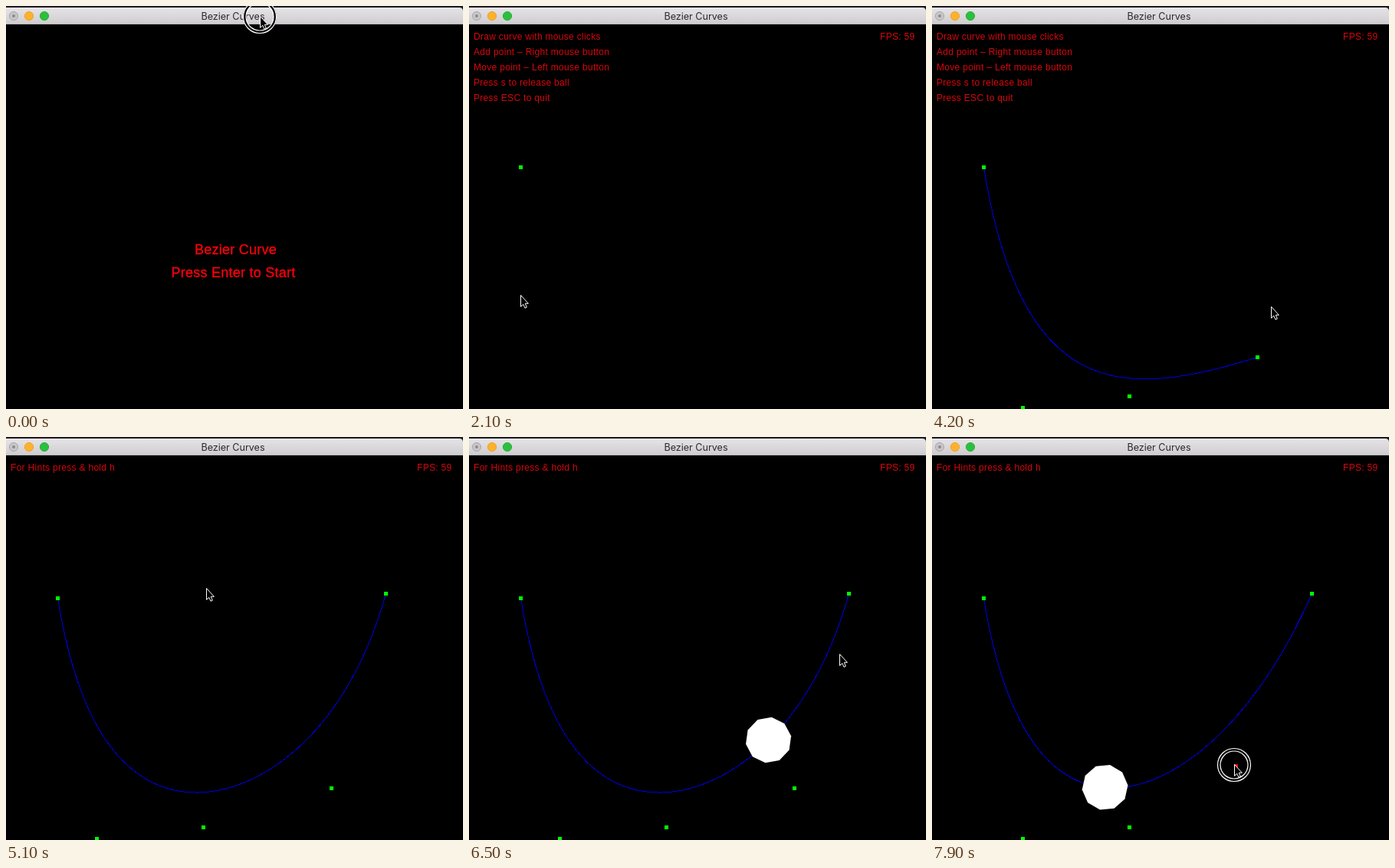
These frames come from a looping animation (596 by 526 pixels, 8 s). An HTML page:

```html
<!DOCTYPE html>
<html lang="en">
<head>
<meta charset="utf-8">
<title>Bezier Curves</title>
<style>
  html, body { margin: 0; width: 100%; height: 100%; overflow: hidden; background: #000; }
  svg { display: block; width: 596px; height: 526px; }
  text { white-space: pre; }
  .title { font: 12.55px Inter, "Open Sans", sans-serif; fill: #2b292b; text-anchor: middle; }
  .menu { font: 18px "Liberation Sans", Arial, sans-serif; letter-spacing: .25px; fill: #fa000a; stroke: #fa000a; stroke-width: .35px; }
  .hud { font: 12px "Liberation Sans", Arial, sans-serif; letter-spacing: .3px; fill: #d8060c; }
</style>
</head>
<body>
<svg viewBox="0 0 596 526">
  <defs>
    <linearGradient id="bar" x2="0" y2="1">
      <stop offset="0" stop-color="#e6e4e6"/>
      <stop offset="1" stop-color="#ceccce"/>
    </linearGradient>
  </defs>
  <rect width="596" height="526"/>
  <rect width="596" height="8" fill="#1d1c24"/>
  <path d="M0 24V2H591Q596 2 596 7V24Z" fill="url(#bar)"/>
  <rect y="23" width="596" height="1" fill="#b9b7b9"/>
  <circle cx="10" cy="13" r="5.6" fill="#c8c6c8" stroke="#a9a7a9"/>
  <circle cx="10" cy="13" r="2" fill="#8d8b8d"/>
  <circle cx="30" cy="13" r="5.6" fill="#fdb12c" stroke="#eba327"/>
  <circle cx="50" cy="13" r="5.6" fill="#2cbf3f" stroke="#25b037"/>
  <text class="title" x="296" y="18">Bezier Curves</text>

  <g id="menu" class="menu">
    <text x="246" y="324">Bezier Curve</text>
    <text x="215.5" y="354">Press Enter to Start</text>
  </g>
  <g id="hints" class="hud">
    <text x="6" y="44">Draw curve with mouse clicks</text>
    <text x="6" y="64">Add point – Right mouse button</text>
    <text x="6" y="84">Move point – Left mouse button</text>
    <text x="6" y="104">Press s to release ball</text>
    <text x="6" y="124">Press ESC to quit</text>
  </g>
  <text id="short" class="hud" x="6" y="44">For Hints press &amp; hold h</text>
  <text id="fps" class="hud" x="536" y="44">FPS: 59</text>

  <polyline id="curve" fill="none" stroke="#0000dc" shape-rendering="crispEdges" transform="translate(.5 .5)"/>
  <g id="points"></g>
  <polygon id="ball" fill="#fff"/>
  <g id="ring" fill="none">
    <circle r="20" stroke="#000" stroke-width="4"/>
    <circle r="21.5" stroke="#fff" stroke-width="1.2"/>
    <circle r="18" stroke="#fff" stroke-width="1.2"/>
  </g>
  <path id="cursor" d="M.5 .5V15.4L3.8 12.3 6 17.3 8.3 16.2 6.3 11.3H10.4Z" stroke="#fff"/>
</svg>
<script>
const LOOP = 8000, STEP = 100, PAUSE = 100;
const ENTER = 1300, HIDE_HINTS = 4400, RELEASE = 5400;
const RADIUS = 30, SIDES = 10, SEGMENTS = 60;

// where the mouse goes: arrival time, place, what it does there
const STOPS = [
  [0, 331, 13, "click"],
  [900, 192, 143, "click"],
  [1700, 67, 210, "add"],
  [2100, 67, 377],
  [2400, 118, 524, "add"],
  [3000, 257, 509, "add"],
  [3300, 353, 487],
  [3900, 424, 458, "add"],
  [4600, 495, 204, "add"],
  [5100, 261, 197],
  [5400, 261, 197],
  [6000, 515, 189],
  [7100, 423, 457],
  [7400, 423, 457, "drag"],
  [7900, 394, 427]
].map(([t, x, y, act]) => ({ t, x, y, act }));

const ADDED = STOPS.filter(s => s.act === "add");
const GRAB = STOPS.find(s => s.act === "drag").t;
const DRAGGED = 3;

const $ = id => document.getElementById(id);
const show = (el, on) => el.setAttribute("visibility", on ? "visible" : "hidden");
const mix = (a, b, u) => a + (b - a) * u;
const ease = u => u * u * (3 - 2 * u);

function mouseAt(t) {
  const i = STOPS.findLastIndex(s => t >= s.t);
  const a = STOPS[i], b = STOPS[i + 1] || a;
  const from = a.t + PAUSE;
  const u = t > from && b !== a ? ease((t - from) / (b.t - from)) : 0;
  return [mix(a.x, b.x, u), mix(a.y, b.y, u)];
}

function pressed(t) {
  return t >= GRAB || STOPS.some(s => s.act && t >= s.t && t < s.t + PAUSE);
}

function controlPoints(t, [mx, my]) {
  const pts = ADDED.filter(s => t >= s.t).map(s => [s.x, s.y]);
  if (t >= GRAB) pts[DRAGGED] = [mx + 2, my + 2];
  return pts;
}

function bezier(pts, u) {
  let p = pts;
  while (p.length > 1) {
    p = p.slice(1).map((q, i) => [mix(p[i][0], q[0], u), mix(p[i][1], q[1], u)]);
  }
  return p[0];
}

// points along the curve from its start to u
function trace(pts, u) {
  return Array.from({ length: SEGMENTS + 1 }, (_, i) => bezier(pts, u * i / SEGMENTS));
}

function lengthOf(line) {
  return line.slice(1).reduce((sum, [x, y], i) => sum + Math.hypot(x - line[i][0], y - line[i][1]), 0);
}

// damped swing along the curve parameter
function swing(sec) {
  return 0.494 - 0.491 * Math.exp(-0.0713 * sec) * Math.cos(1.9483 * sec);
}

function drawBall(pts, t) {
  show($("ball"), t >= RELEASE);
  if (t < RELEASE) return;
  const path = trace(pts, swing((t - RELEASE) / 1000));
  const [cx, cy] = path[SEGMENTS];
  const turn = lengthOf(path) / RADIUS + 0.07;
  const corners = Array.from({ length: SIDES }, (_, i) => {
    const a = turn + i * 2 * Math.PI / SIDES;
    return [cx + RADIUS * Math.cos(a), cy + RADIUS * Math.sin(a)];
  });
  $("ball").setAttribute("points", corners.join(" "));
}

const dots = ADDED.map(() => {
  const r = document.createElementNS("http://www.w3.org/2000/svg", "rect");
  r.setAttribute("width", 5);
  r.setAttribute("height", 5);
  return $("points").appendChild(r);
});

function drawDots(pts, t) {
  dots.forEach((dot, i) => {
    const p = pts[i];
    show(dot, p);
    if (!p) return;
    dot.setAttribute("x", Math.round(p[0]) - 2);
    dot.setAttribute("y", Math.round(p[1]) - 2);
    dot.setAttribute("fill", i === DRAGGED && t >= GRAB ? "#f00" : "#0f0");
  });
}

function draw(t) {
  const mouse = mouseAt(t).map(Math.round);
  const pts = controlPoints(t, mouse);

  show($("menu"), t < ENTER);
  show($("hints"), t >= ENTER && t < HIDE_HINTS);
  show($("short"), t >= HIDE_HINTS);
  show($("fps"), t >= ENTER);

  $("curve").setAttribute("points", pts.length > 1 ? trace(pts, 1).join(" ") : "");
  drawDots(pts, t);
  drawBall(pts, t);

  show($("ring"), pressed(t));
  $("ring").setAttribute("transform", `translate(${mouse[0]} ${mouse[1] + 1})`);
  $("cursor").setAttribute("transform", `translate(${mouse})`);
}

const start = performance.now();
function tick() {
  const t = (performance.now() - start) % LOOP;
  draw(Math.floor(t / STEP) * STEP);
  requestAnimationFrame(tick);
}
draw(0);
requestAnimationFrame(tick);
</script>
</body>
</html>
```
